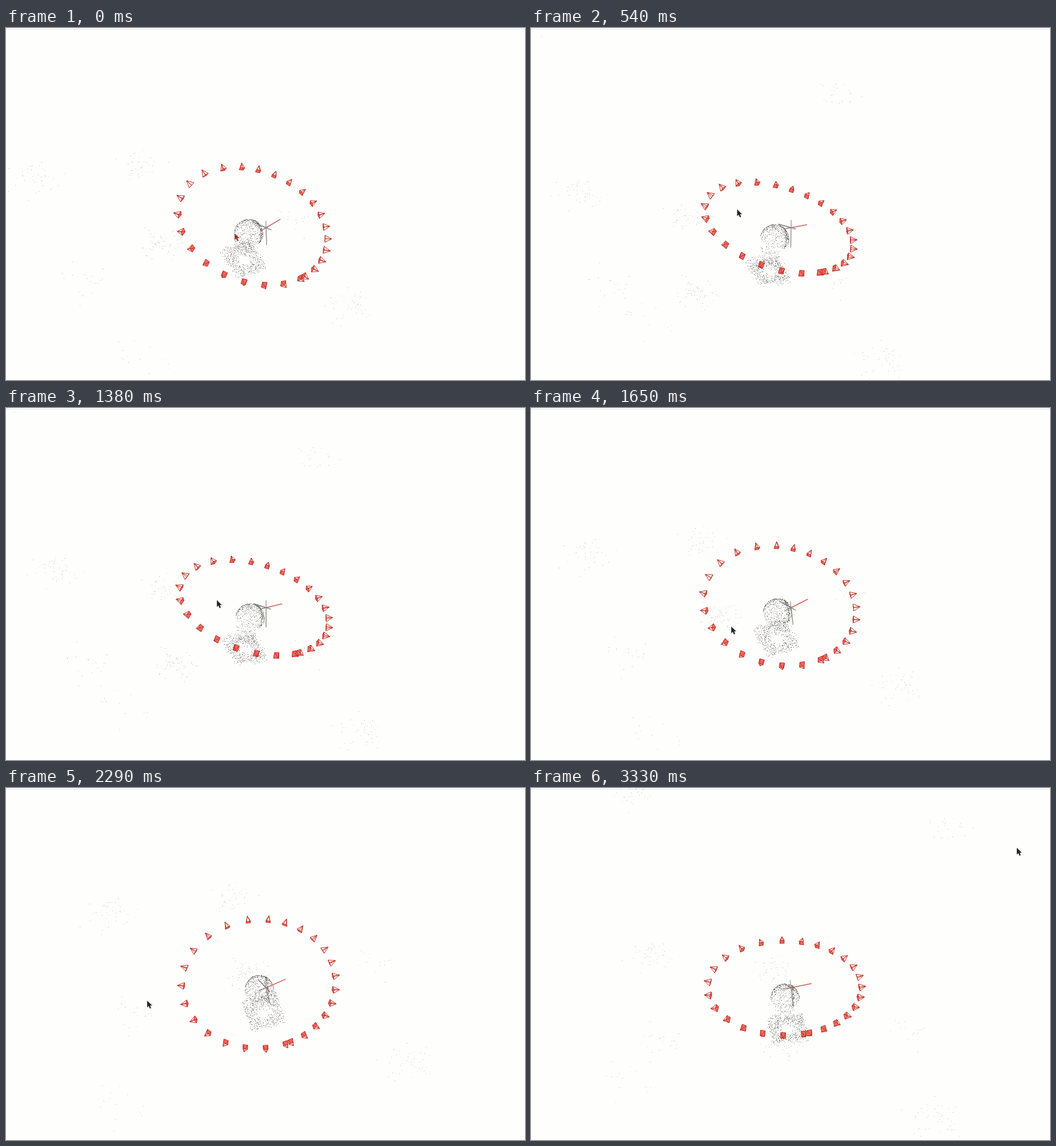
Write an HTML page with a canvas that moves like this. It is 908 by 617 pixels and loops after 3.4 s.

```html
<!DOCTYPE html>
<html lang="en">
<head>
<meta charset="utf-8">
<title>Camera ring around a point cloud</title>
<style>
html, body { margin: 0; width: 100%; height: 100%; overflow: hidden; background: #fefefd; }
canvas { display: block; }
</style>
</head>
<body>
<canvas id="stage" width="908" height="617"></canvas>
<script>
const ctx = document.getElementById('stage').getContext('2d');
const LOOP = 3400, PIVOT = [455, 350], DIST = 1391, RAD = Math.PI / 180;

// Scene axes: right, toward the viewer, up; the origin is the pivot.
const RING_MID = [-13, -18, -10.5], TARGET = [-12, -25, -55];
const HELMET = [-11.5, -26, -45], BASE = [-6, -18, -112];
const CAMERAS = 26;

// time, tilt, yaw, cursor x, cursor y
const KEYS = [
  [0, 46.8, -40, 400, 360],
  [270, 40.3, -36.7, 383, 348],
  [900, 25.2, -16, 341, 286],
  [1380, 35.2, -27, 369, 337],
  [1860, 59, -27, 324, 404],
  [2290, 58.3, -3, 247, 373],
  [2790, 39, 0.7, 245, 318],
  [3330, 39, 0.7, 850, 105]
];

const add = (a, b, k = 1) => a.map((v, i) => v + b[i] * k);
const unit = a => { const l = Math.hypot(...a); return a.map(v => v / l); };
const cross = (a, b) => [
  a[1] * b[2] - a[2] * b[1], a[2] * b[0] - a[0] * b[2], a[0] * b[1] - a[1] * b[0]
];

let seed = 71;
function rnd() {
  seed = (seed * 1664525 + 1013904223) >>> 0;
  return seed / 4294967296;
}
const between = (a, b) => a + rnd() * (b - a);
const spread = s => (rnd() + rnd() + rnd() - 1.5) * s;
const polar = (r, a, n) => [r * Math.cos(a), r * Math.sin(a), n];

const points = [];
function scatter(count, mid, alpha, place) {
  for (let i = 0; i < count; i++) {
    const g = between(70, 140) | 0;
    points.push({ pos: add(mid, place()), alpha: alpha * between(0.7, 1.2), color: `rgb(${g + 4},${g},${g - 5})` });
  }
}

function onDome() {
  const h = rnd();
  return polar(26 * Math.sqrt(1 - h * h), between(0, 2 * Math.PI), h * 27 - 1);
}

function onCrest() {
  const p = 14 + spread(3), r = Math.sqrt(676 - p * p), a = between(-10, 140) * RAD;
  return [p, r * Math.cos(a), r * Math.sin(a)];
}

function onNeck() {
  return polar(between(8, 19), between(0, 2 * Math.PI), between(-20, -52));
}

// a square slab with a round hole, turned a little
function onBase() {
  let x, y;
  do {
    x = between(-34, 34);
    y = between(-34, 34);
  } while (Math.hypot(x, y) < between(11, 18));
  const c = Math.cos(12 * RAD), s = Math.sin(12 * RAD);
  return [x * c + y * s, y * c - x * s, spread(8)];
}

scatter(480, HELMET, 0.72, onDome);
scatter(120, HELMET, 0.78, onCrest);
scatter(110, HELMET, 0.65, onNeck);
scatter(600, BASE, 0.75, onBase);

// loose clumps in the background: how many points, where
const CLUMPS = [
  [40, 288, 25, -305],
  [36, -37, -447, -302],
  [60, -25, -295, -410],
  [40, -305, -340, -185],
  [14, -265, 170, -60],
  [20, 375, -755, -80],
  [32, -400, -685, 30],
  [14, 265, -230, -293],
  [18, -265, -120, -240]
];
for (const [count, ...mid] of CLUMPS) {
  scatter(count, mid, 0.42, () => [spread(50), spread(40), spread(28)]);
}

// two arcs of evenly spaced cameras, the front-left one spaced wider
function ringAngle(i) {
  const k = i % 13, bend = Math.sin(k * Math.PI / 12);
  return RAD * (i < 13 ? -77.4 + 12.24 * k + 3.6 * bend : 73.8 + 16.1 * k - 3.4 * bend);
}

function makeFrustum(i) {
  const a = ringAngle(i), r = 137.8 + 4 * Math.cos(a + 70 * RAD);
  const pos = add(RING_MID, polar(r, a, 0));
  const look = unit(add(TARGET, pos, -1));
  const side = unit(cross(look, [0, 0, 1])), up = cross(side, look);
  const plane = add(pos, look, 5.5);
  const corner = (x, y) => add(add(plane, side, 4 * x), up, 5 * y);
  return { apex: add(pos, look, -6.5), corners: [corner(-1, -1), corner(1, -1), corner(1, 1), corner(-1, 1)] };
}
const frusta = Array.from({ length: CAMERAS }, (_, i) => makeFrustum(i));

const X_AXIS = [36, -15.3, -2], Y_AXIS = [5.1, 13.9, -32.9];
const Z_AXIS = cross(X_AXIS, Y_AXIS).map(v => -v / 43);
const AXES = [
  [Y_AXIS, '#92958f', '#a3a5a0'],
  [Z_AXIS, '#77777a', '#8b8987'],
  [X_AXIS, '#cd5f58', '#96827e']
];

// smooth path through the keys that never overshoots them
function slope(i, c) {
  const rate = j => (KEYS[j + 1][c] - KEYS[j][c]) / (KEYS[j + 1][0] - KEYS[j][0]);
  if (i === 0) return rate(0);
  if (i === KEYS.length - 1) return 0;
  const a = rate(i - 1), b = rate(i);
  return a * b <= 0 ? 0 : 2 * a * b / (a + b);
}

function sample(t) {
  let i = 0;
  while (i < KEYS.length - 2 && t >= KEYS[i + 1][0]) i++;
  const a = KEYS[i], b = KEYS[i + 1], span = b[0] - a[0];
  const u = Math.min(1, (t - a[0]) / span), u2 = u * u, u3 = u2 * u;
  return [1, 2, 3, 4].map(c =>
    a[c] * (2 * u3 - 3 * u2 + 1) + b[c] * (3 * u2 - 2 * u3) +
    span * (slope(i, c) * (u3 - 2 * u2 + u) + slope(i + 1, c) * (u3 - u2)));
}

function makeView(tilt, yaw) {
  // the trackball rolls along with the other two turns
  const roll = 0.27 * (43 - tilt) - 0.6 * yaw;
  const [st, sy, sr] = [tilt, yaw, roll].map(d => Math.sin(d * RAD));
  const [ct, cy, cr] = [tilt, yaw, roll].map(d => Math.cos(d * RAD));
  return ([p, q, n]) => {
    const x = p * cy - q * sy, z = p * sy + q * cy;
    const y = z * st - n * ct, w = z * ct + n * st;
    const s = 1 / (1 - w / DIST);
    return [PIVOT[0] + s * (x * cr - y * sr), PIVOT[1] + s * (x * sr + y * cr), w];
  };
}

function path(pts, closed) {
  ctx.beginPath();
  pts.forEach(p => ctx.lineTo(p[0], p[1]));
  if (closed) ctx.closePath();
}

function drawPoints(view) {
  for (const { pos, alpha, color } of points) {
    const [x, y] = view(pos);
    ctx.globalAlpha = alpha;
    ctx.fillStyle = color;
    ctx.fillRect(Math.round(x), Math.round(y), 1, 1);
  }
  ctx.globalAlpha = 1;
}

function drawAxes(view) {
  ctx.lineWidth = 1.5;
  for (const [dir, color, tail] of AXES) {
    for (const [k, c] of [[-0.38, tail], [1, color]]) {
      ctx.strokeStyle = c;
      path([PIVOT, view(dir.map(v => v * k))]);
      ctx.stroke();
    }
  }
}

function drawFrusta(view) {
  ctx.lineWidth = 1;
  ctx.lineJoin = 'round';
  ctx.strokeStyle = '#bf2c20';
  ctx.fillStyle = 'rgba(240,48,38,0.72)';
  const shown = frusta.map(f => ({ apex: view(f.apex), corners: f.corners.map(view) }));
  shown.sort((a, b) => a.apex[2] - b.apex[2]);
  for (const { apex, corners } of shown) {
    path(corners, true);
    ctx.fill();
    ctx.stroke();
    for (const c of corners) {
      path([apex, c]);
      ctx.stroke();
    }
  }
}

function drawCursor(x, y, color) {
  const shape = [[0, 0], [0, 11.5], [2.7, 9.2], [4.7, 13.6], [6.8, 12.7], [4.9, 8.4], [8.4, 8.2]];
  path(shape.map(([i, j]) => [x + i, y + j]), true);
  ctx.lineWidth = 1.6;
  ctx.strokeStyle = 'rgba(225,225,225,0.9)';
  ctx.stroke();
  ctx.fillStyle = color;
  ctx.fill();
}

function draw(t) {
  const [tilt, yaw, cx, cy] = sample(t);
  const view = makeView(tilt, yaw);
  ctx.fillStyle = '#fefefd';
  ctx.fillRect(0, 0, 908, 617);
  ctx.fillStyle = '#f9f9f8';
  ctx.fillRect(0, 0, 908, 2);
  ctx.fillStyle = '#ededec';
  ctx.fillRect(0, 2, 908, 1);
  drawPoints(view);
  drawAxes(view);
  drawFrusta(view);
  drawCursor(cx, cy, t < 70 ? '#b02a24' : '#26262a');
}

const start = performance.now();
function tick() {
  draw((performance.now() - start) % LOOP);
  requestAnimationFrame(tick);
}
tick();
</script>
</body>
</html>
```
